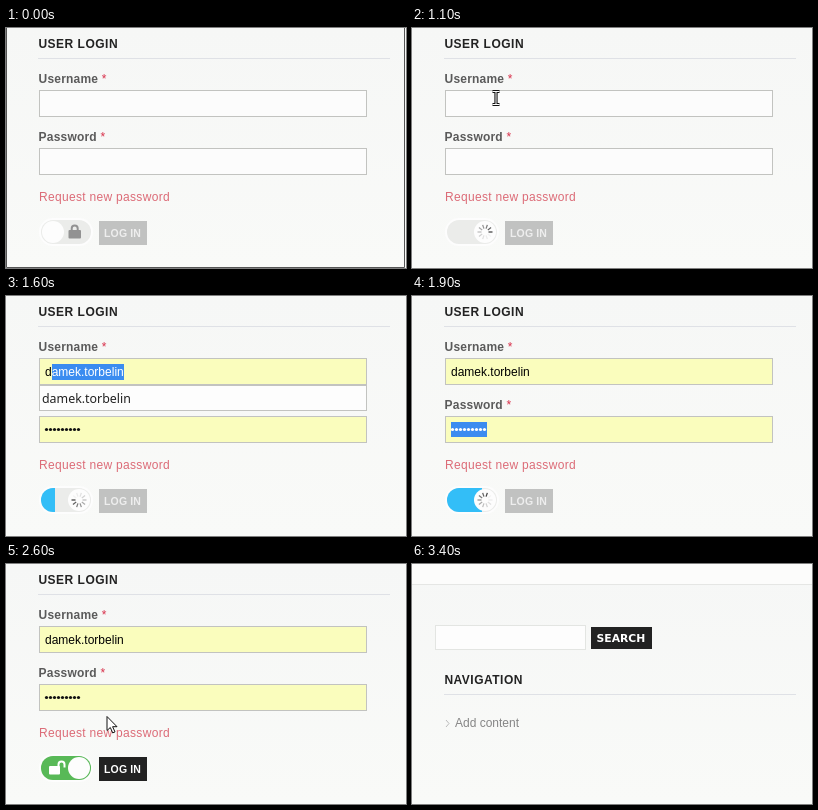
Recreate the animation shown at these times as an HTML page. Size 400 by 240 pixels, loop 3.5 s.

```html
<!DOCTYPE html>
<html lang="en">
<head>
<meta charset="utf-8">
<title>Login form</title>
<style>
  html, body { margin: 0; width: 100%; height: 100%; overflow: hidden; background: #f7f8f7; }
  svg { display: block; width: 100vw; height: 100vh; }
  text { font: 12px "Liberation Sans", Arial, sans-serif; white-space: pre; }
  .title { font-weight: bold; fill: #222; letter-spacing: .5px; }
  .label { font-weight: bold; fill: #5a5a5a; letter-spacing: .2px; }
  .star { font-weight: normal; fill: #d8304a; }
  .link { fill: #dc6b77; letter-spacing: .31px; }
  .btn { font-size: 10.5px; font-weight: bold; letter-spacing: .15px; }
  .wide { font: bold 10.8px "DejaVu Sans", sans-serif; fill: #fff; }
  .menu { font: 12.4px "Noto Sans", sans-serif; fill: #222; }
  .box { stroke: #c2c3c0; }
  .rule { stroke: #dfe1e6; }
</style>
</head>
<body>
<svg viewBox="0 0 400 240" xmlns="http://www.w3.org/2000/svg">
  <defs>
    <linearGradient id="shade" x1="0" y1="0" x2="0" y2="1">
      <stop offset="0" stop-color="#f6f7f6"/>
      <stop offset="1" stop-color="#f9faf8"/>
    </linearGradient>
    <clipPath id="pill"><rect x="35" y="192" width="50" height="24" rx="12"/></clipPath>
  </defs>
  <rect width="400" height="240" fill="url(#shade)"/>

  <g id="login">
    <text class="title" x="32.4" y="20">USER LOGIN</text>
    <path class="rule" d="M32 30.5H384"/>
    <text class="label" x="32.6" y="55">Username <tspan class="star">*</tspan></text>
    <text class="label" x="32.6" y="113">Password <tspan class="star">*</tspan></text>
    <rect id="userBox" class="box" x="33.5" y="62.5" width="327" height="26"/>
    <rect id="passBox" class="box" x="33.5" y="120.5" width="327" height="26"/>
    <rect id="userSel" x="46" y="68" width="72" height="16" fill="#3b8cf0"/>
    <text x="39" y="80"><tspan id="head"></tspan><tspan id="tail"></tspan></text>
    <rect id="passSel" x="39" y="126" width="36" height="15" fill="#3b8cf0"/>
    <g id="dots"></g>
    <path id="caret" stroke="#222"/>
    <g id="menu">
      <rect class="box" x="33.5" y="89.5" width="327" height="25" fill="#fdfdfd"/>
      <text id="option" class="menu" x="36" y="107"></text>
    </g>
    <text class="link" x="33" y="173">Request new password</text>

    <rect x="33" y="190" width="54" height="28" rx="14" fill="#fdfdfd"/>
    <g clip-path="url(#pill)">
      <rect x="35" y="192" width="50" height="24" fill="#ebecea"/>
      <rect id="fill" x="35" y="192" height="24"/>
    </g>
    <g id="lock" fill="#929292">
      <rect x="62.5" y="202" width="12.5" height="8.5" rx="1"/>
      <path d="M65.7 203v-2.5a3 3 0 0 1 6 0v2.5" fill="none" stroke="#929292" stroke-width="2"/>
    </g>
    <g id="unlock" fill="#fff">
      <rect x="43" y="202" width="11" height="8.5" rx="1"/>
      <path d="M52.5 203v-2.5a3 3 0 0 1 6 0v3" fill="none" stroke="#fff" stroke-width="2"/>
    </g>
    <circle id="knob" cy="204" r="11" fill="#fdfdfd"/>
    <g id="spinner"></g>
    <rect id="button" x="93" y="193" width="48" height="24"/>
    <text id="caption" class="btn" x="98" y="209">LOG IN</text>
    <path id="frame" d="M.5 0V239.5H398.5V0" fill="none" stroke="#555"/>
  </g>

  <g id="home">
    <rect width="400" height="20" fill="#fcfcfb"/>
    <path d="M0 20.5H400" stroke="#e5e6e4"/>
    <rect x="23.5" y="61.5" width="150" height="24" fill="#fdfdfd" stroke="#e3e5e2"/>
    <rect x="179" y="63" width="61" height="22" fill="#222"/>
    <text class="wide" x="184.5" y="78">SEARCH</text>
    <text class="title" x="32.4" y="120">NAVIGATION</text>
    <path class="rule" d="M32 130.5H384"/>
    <path d="M34 156l3 3.5l-3 3.5" fill="none" stroke="#bbb"/>
    <text x="43" y="163" fill="#858585">Add content</text>
  </g>

  <g id="cursor" stroke-linejoin="round">
    <path id="hand" fill="#fff" stroke="#111" stroke-width="1.4"
      d="M-1.5 9V1.5a1.5 1.5 0 0 1 3 0V6q1.6-.8 3 .3q1.6-.7 3 .5q3.2-.3 3.5 2V12l-1.5 2.5V16H-.5V14.5L-4.3 10.5q-.7-2.2 1-2.3z M2.5 11.5v1 M5 11.5v1 M7.5 11.5v1"/>
    <path id="arrow" fill="#fff" stroke="#111" d="M0 0V14l3.3-3l2.4 5.4l2.3-1l-2.4-5.2H10z"/>
    <g id="beam" fill="none">
      <path d="M-3.5-6.5H3.5M0-6.5V6.5M-3.5 6.5H3.5" stroke="#111" stroke-width="3.2"/>
      <path d="M-3.5-6.5H3.5M0-6.5V6.5M-3.5 6.5H3.5" stroke="#fff"/>
    </g>
  </g>
</svg>

<script>
const LOOP = 3500, STEP = 100, USER = "damek.torbelin";
const PAUSES = [[300, 700], [1100, 1300], [2900, 3400]];
const SPOKES = 10;

// Cursor keys: time, x, y
const DRAG = [[300, 47, 199], [700, 57, 198], [900, 73, 199], [1000, 79, 140], [1100, 84, 70], [1400, 84, 70]];
const CLICK = [[2500, 92, 120], [2700, 110, 185], [2900, 121, 212], [3400, 121, 212]];

const el = {};
document.querySelectorAll("[id]").forEach(n => el[n.id] = n);

const set = (node, attrs) => {
  for (const k in attrs) node.setAttribute(k, attrs[k]);
};
const show = (node, on) => { node.style.display = on ? "" : "none"; };
const clamp = (v, lo, hi) => Math.min(hi, Math.max(lo, v));
const ramp = (t, t0, t1, a, b) => a + (b - a) * clamp((t - t0) / (t1 - t0), 0, 1);

function add(parent, tag, attrs) {
  const node = document.createElementNS("http://www.w3.org/2000/svg", tag);
  set(node, attrs);
  parent.append(node);
}

for (let i = 0; i < 9; i++) add(el.dots, "circle", { cx: 40.5 + i * 4, cy: 133.5, r: 1.6 });
for (let i = 0; i < SPOKES; i++) {
  add(el.spinner, "path", {
    d: "M3.5 0H7.5", stroke: "#333", "stroke-width": 1.3,
    transform: `rotate(${i * 360 / SPOKES})`, opacity: 0.05 + 0.85 * (i / (SPOKES - 1)) ** 1.5
  });
}
el.option.textContent = USER;

// The picture advances in steps and rests during pauses
function snap(t) {
  const pause = PAUSES.find(([a, b]) => t >= a && t < b);
  return pause ? pause[0] : Math.floor(t / STEP) * STEP;
}

function along(keys, t) {
  const i = keys.findIndex(k => k[0] > t);
  if (i < 1) return null;
  const [t0, x0, y0] = keys[i - 1], [t1, x1, y1] = keys[i];
  return [ramp(t, t0, t1, x0, x1), ramp(t, t0, t1, y0, y1)];
}

function drawFields(t) {
  const filled = t >= 1600, menu = t >= 1500 && t < 1800;
  const passSel = t >= 1900 && t < 2200;
  const color = filled ? "#fafdbd" : "#fcfcfc";
  set(el.userBox, { fill: color });
  set(el.passBox, { fill: color });
  el.head.textContent = t >= 1500 ? USER[0] : "";
  el.tail.textContent = filled ? USER.slice(1) : "";
  set(el.tail, { fill: filled && menu ? "#fff" : "#000" });
  show(el.userSel, filled && menu);
  show(el.menu, menu);
  show(el.dots, filled);
  show(el.passSel, passSel);
  set(el.dots, { fill: passSel ? "#fff" : "#111" });
  show(el.caret, t >= 1300 && t < 1600);
  set(el.caret, { d: `M${t < 1500 ? 39.5 : 46.5} 69V82` });
}

function drawSwitch(t) {
  const open = t >= 2300, busy = t >= 900 && !open, ready = t >= 2400;
  set(el.fill, open
    ? { width: 50, fill: "#58b957" }
    : { width: ramp(t, 1400, 1900, 0, 35), fill: "#33bef7" });
  set(el.knob, { cx: ramp(t, 700, 900, 47, 73) });
  show(el.lock, t < 900);
  show(el.unlock, open);
  show(el.spinner, busy);
  set(el.spinner, { transform: `translate(73 204) rotate(${(t - 1100) / STEP * 36 + 36})` });
  set(el.button, { fill: ready ? "#222" : "#c1c2c1" });
  set(el.caption, { fill: ready ? "#fff" : "#eee" });
}

function drawCursor(t) {
  const p = along(DRAG, t) || along(CLICK, t);
  show(el.cursor, p);
  if (!p) return;
  const [x, y] = p;
  const kind = y > 195 ? "hand" : t === 1000 || t >= 2500 ? "arrow" : "beam";
  for (const k of ["hand", "arrow", "beam"]) show(el[k], k === kind);
  set(el.cursor, { transform: `translate(${x} ${y})` });
}

function render(time) {
  const t = snap(time % LOOP), home = t >= 3400;
  show(el.login, !home);
  show(el.home, home);
  show(el.frame, t < 100);
  drawFields(t);
  drawSwitch(t);
  drawCursor(t);
}

const start = performance.now();
function tick() {
  render(performance.now() - start);
  requestAnimationFrame(tick);
}
tick();
</script>
</body>
</html>
```
